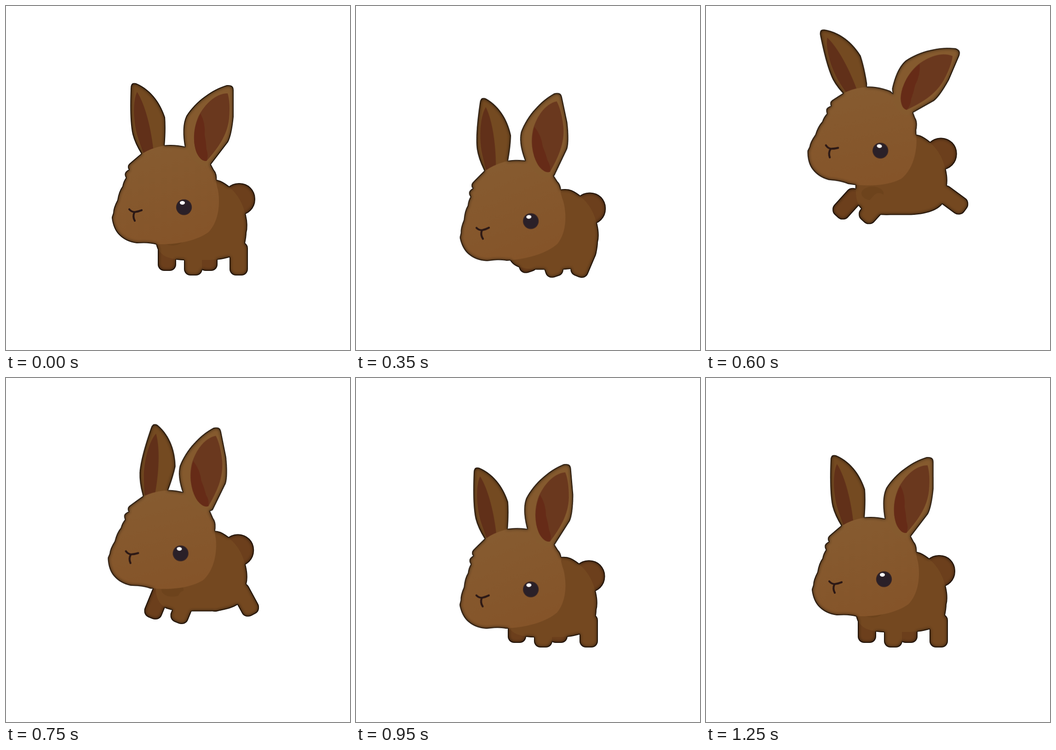
These frames come from a looping animation (748 px wide and 748 px high, 1300 ms). An HTML page:

```html
<!DOCTYPE html>
<html lang="en">
<head>
<meta charset="utf-8">
<title>Hopping rabbit</title>
<style>
  html, body { margin: 0; width: 100%; height: 100%; overflow: hidden; background: #fff; }
  svg { display: block; width: 100%; height: 100%; }
  .fur { fill: #744820; }
  .far { fill: #6c3f1c; }
  .mouth { fill: none; stroke: #2b1815; stroke-width: 4.2; stroke-linecap: round; }
</style>
</head>
<body>
<svg viewBox="0 0 748 748">
  <defs>
    <linearGradient id="face" gradientUnits="userSpaceOnUse" x1="320" y1="310" x2="390" y2="510">
      <stop offset="0" stop-color="#865b30"/>
      <stop offset="1" stop-color="#855429"/>
    </linearGradient>
    <!-- dark outline around the whole silhouette, fading inwards -->
    <filter id="rim" filterUnits="userSpaceOnUse" x="0" y="0" width="748" height="748" color-interpolation-filters="sRGB">
      <feMorphology in="SourceAlpha" operator="dilate" radius="1" result="outline"/>
      <feFlood flood-color="#1c1007"/>
      <feComposite in2="outline" operator="in" result="ink"/>
      <feGaussianBlur in="SourceAlpha" stdDeviation="1"/>
      <feComponentTransfer result="line"><feFuncA type="linear" slope="-2" intercept="1.75"/></feComponentTransfer>
      <feGaussianBlur in="SourceAlpha" stdDeviation="3.6"/>
      <feComponentTransfer result="soft"><feFuncA type="linear" slope="-.8" intercept=".8"/></feComponentTransfer>
      <feMerge result="dark"><feMergeNode in="soft"/><feMergeNode in="line"/></feMerge>
      <feComposite in="dark" in2="SourceAlpha" operator="in" result="edge"/>
      <feMerge><feMergeNode in="ink"/><feMergeNode in="SourceGraphic"/><feMergeNode in="edge"/></feMerge>
    </filter>
    <rect id="leg" x="-19" y="-52" width="38" height="71" rx="14"/>
  </defs>
  <g filter="url(#rim)">
    <circle id="tail" class="far" cx="507" cy="420" r="34"/>
    <use id="foreFar" class="far" href="#leg"/>
    <use id="hindFar" class="far" href="#leg"/>
    <g id="body">
      <path class="fur" d="M340 430C328 460 323 490 327 516Q331 538 350 546Q370 553 400 552L445 552C485 550 514 539 519 515Q522 500 522 492Q526 478 521 456C514 420 493 394 465 381Q448 375 430 384Z"/>
      <ellipse cx="362" cy="506" rx="24" ry="15" fill="#6d431c"/>
    </g>
    <use id="foreNear" class="fur" href="#leg"/>
    <use id="hindNear" class="fur" href="#leg"/>
    <g id="head">
      <g id="earL">
        <path fill="#744a21" d="M296 322Q281 298 276 278C270 250 271 210 272 180Q272 166 282 169C318 184 337 218 345 243Q347 268 344 304L335 340L305 340Z"/>
        <path fill="#613019" d="M285 187C276 205 276 245 285 280Q291 300 300 322L321 318C316 268 303 215 285 187Z"/>
      </g>
      <path fill="url(#face)" d="M296 321Q278 336 269 344Q263 350 269 356Q257 362 260 369L262 374Q256 382 254 393Q246 404 243 423Q234 440 234 451L231 460Q234 484 247 497Q262 512 285 515Q312 513 328 518C375 519 415 510 440 492C456 476 463 450 463 425Q463 405 459 393L457 382Q459 366 451 357L443 342L390 307Q365 301 342 304Q315 309 296 321Z"/>
      <g id="earR">
        <path fill="#855a2e" d="M390 307C385 280 385 257 393 240C413 208 450 182 481 173Q494 172 494 184L494 240Q490 280 482 295L443 346Q422 352 405 332Z"/>
        <path fill="#6a381e" d="M482 190C455 190 432 215 420 237C406 265 406 298 415 320Q424 338 436 337C458 312 481 283 485 245Q488 210 482 190Z"/>
        <path fill="#662b17" d="M423 234C406 265 406 298 415 320Q424 338 436 337Q441 325 436 312Q435 295 432 280Q434 255 423 234Z"/>
      </g>
      <circle cx="387" cy="437.5" r="17.2" fill="#3a2624"/>
      <circle cx="387" cy="437.5" r="15.8" fill="#2a2028"/>
      <ellipse cx="383.5" cy="428" rx="5.5" ry="4" fill="#fff"/>
      <path class="mouth" d="M268 442Q273 448 280 448Q288 447 295 444M279 449Q275 458 280 467"/>
    </g>
  </g>
</svg>
<script>
const LOOP = 1300, STEP = 50;

// crouch, take-off, peak, fall, landing
const HEIGHT = [[50, 0], [350, 33.5], [500, -75], [640, -135], [750, -59], [830, 31], [1250, 0]];
const SPLAY = [[50, 0], [350, -9], [500, 18.5], [600, 18.5], [750, -14], [850, 18], [950, -2.5], [1250, 0]];

const smooth = (a, b, t) => {
  const u = Math.min(1, Math.max(0, (t - a) / (b - a)));
  return u * u * (3 - 2 * u);
};

// Hermite curve through the keys, flat at turning points and ends
function curve(keys, t) {
  const slope = i => {
    if (!keys[i - 1] || !keys[i + 1]) return 0;
    const [[ta, a], [, b], [tc, c]] = keys.slice(i - 1, i + 2);
    return (b - a) * (c - b) > 0 ? (c - a) / (tc - ta) : 0;
  };
  const last = keys.length - 1;
  if (t <= keys[0][0]) return keys[0][1];
  if (t >= keys[last][0]) return keys[last][1];
  const i = keys.findIndex(k => k[0] >= t) - 1;
  const [ta, a] = keys[i], [tb, b] = keys[i + 1];
  const h = tb - ta, u = (t - ta) / h, w = 1 - u;
  return a * (1 + 2 * u) * w * w + b * (1 + 2 * w) * u * u
    + h * u * w * (slope(i) * w - slope(i + 1) * u);
}

const place = (id, x, y, angle = 0, px = 0, py = 0) => document.getElementById(id).setAttribute('transform',
  `translate(${x.toFixed(2)} ${y.toFixed(2)}) rotate(${angle.toFixed(2)} ${px} ${py})`);

const split = y => ({ squat: Math.max(y, 0), lift: Math.max(-y, 0) });

function pose(t) {
  const y = curve(HEIGHT, t), splay = curve(SPLAY, t);
  const { squat, lift } = split(y);
  const push = t < 600 ? squat : 0;

  // the head's tilt trails its height
  const trail = split(curve(HEIGHT, t - 30));
  const tilt = trail.lift ** 2 / 1700 - trail.squat * 0.15;
  const lean = smooth(50, 300, t) - smooth(950, 1250, t);
  place('head', -7 * lean + tilt / 4, y, tilt, 350, 420);
  place('earL', 0, 0, -splay - tilt * 0.4, 322, 318);
  place('earR', 0, 0, splay - tilt * 0.4, 415, 322);

  const bodyX = push * 0.09, bodyY = squat ** 2 / 55 - lift * 0.77;
  place('body', bodyX, bodyY);
  place('tail', bodyX + splay * 0.2, bodyY);

  // legs stretch apart in the air and gather under the body before take-off
  const swing = lift * (0.42 - lift * 0.0007) - push * 0.54;
  const foreX = -1.25 * swing, foreY = push * 0.1 - lift * 0.89;
  const hindX = swing, hindY = push * 0.1 - lift * (1.27 - lift * 0.0017);
  place('foreFar', 350 + foreX, 556 + foreY, swing);
  place('foreNear', 407 + foreX, 566 + foreY, swing);
  place('hindFar', 440 + hindX * 0.8, 556 + hindY - push * 0.35, -swing * 0.6);
  place('hindNear', 506 + hindX, 566 + hindY, -swing * 1.27);
}

let start = null;
function tick(now) {
  start ??= now;
  pose(Math.floor((now - start) % LOOP / STEP) * STEP);
  requestAnimationFrame(tick);
}
pose(0);
requestAnimationFrame(tick);
</script>
</body>
</html>
```
